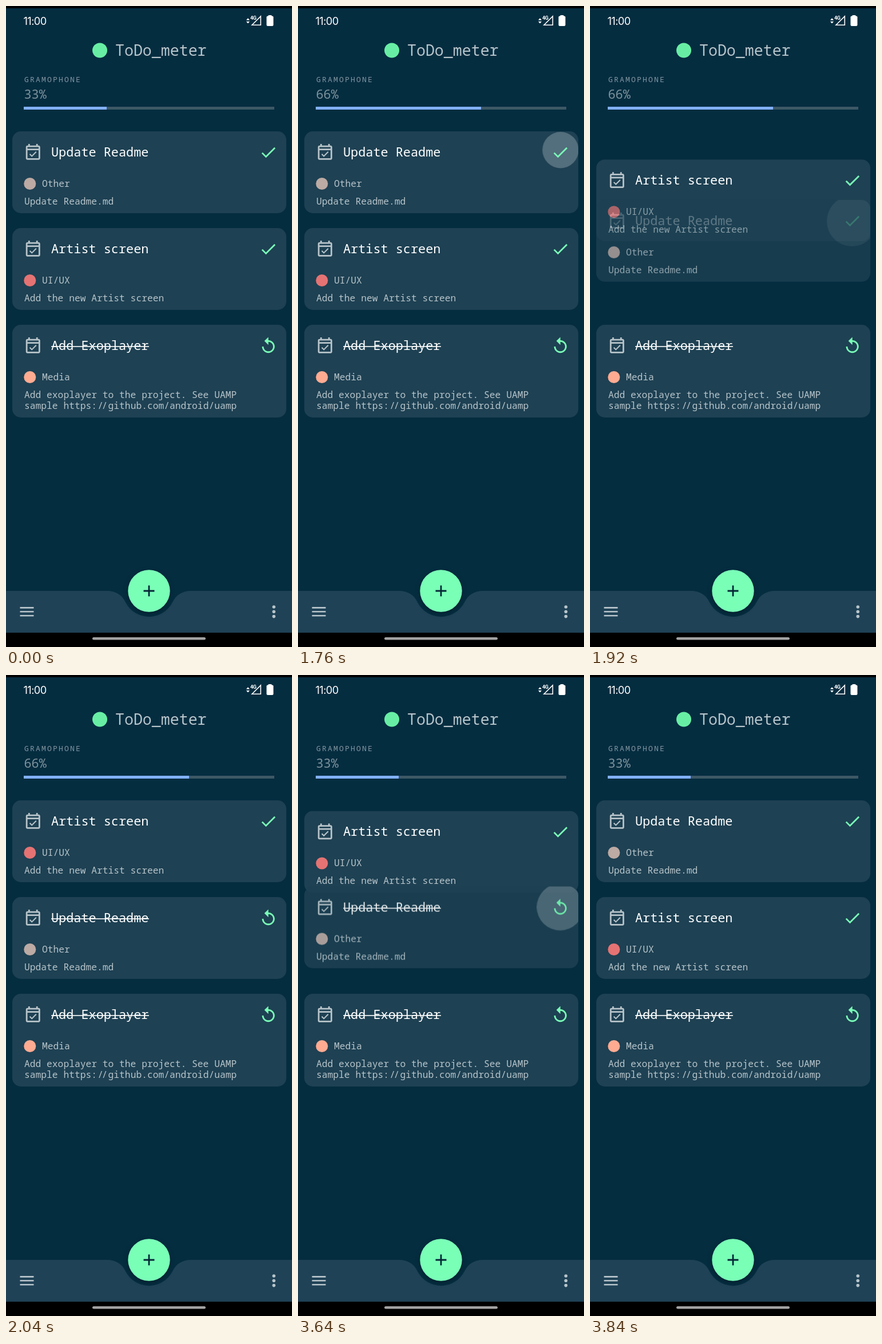
Recreate the animation shown at these times as an HTML page. Size 500x1120 px, loop 3.88 s.

```html
<!DOCTYPE html>
<html lang="en">
<head>
<meta charset="utf-8">
<title>ToDo list</title>
<style>
:root {
  --t: 0ms;
  --tap1: calc(1680ms - var(--t));
  --swap1: calc(1761ms - var(--t));
  --tap2: calc(3505ms - var(--t));
  --swap2: calc(3586ms - var(--t));
  --ease: cubic-bezier(.37, 0, .63, 1);
  --card: #1e4153;
  --green: #7affb7;
  --soft: #b7c4ca;
}
html, body { margin: 0; width: 100%; height: 100%; overflow: hidden; background: #052d40; }
svg { position: absolute; left: 0; top: 0; overflow: visible; }
text { font-family: "Noto Sans Mono", "DejaVu Sans Mono", monospace; font-size: 16.3px; fill: var(--soft); white-space: pre; }
.stage { position: absolute; left: 0; top: 0; width: 500px; height: 1120px; overflow: hidden; }

/* Every animation is paused; the clock --t moves it through its delay. */
.card, .ripple, .bar, .low, .high { animation-play-state: paused !important; }

.card {
  position: absolute; left: 11px; top: 219px; width: 478.5px; height: 142.5px;
  border-radius: 15px; overflow: hidden; background: var(--card); --dy: 169px;
}
.card .title { font-size: 21.85px; fill: #fff; }
.card .icon { fill: var(--soft); }
.card .action { fill: var(--green); }
.strike { fill: #fff; }

.open {
  z-index: 3;
  animation: move 250ms var(--ease) var(--swap1) forwards, back 250ms var(--ease) var(--swap2) forwards,
    hide 250ms var(--ease) var(--swap1) forwards, show 250ms var(--ease) var(--swap2) forwards,
    sink 1ms calc(2400ms - var(--t)) forwards;
}
.done {
  z-index: 1; opacity: 0;
  animation: move 250ms var(--ease) var(--swap1) forwards, back 250ms var(--ease) var(--swap2) forwards,
    show 250ms var(--ease) var(--swap1) forwards, hide 250ms var(--ease) var(--swap2) forwards,
    rise 1ms calc(2400ms - var(--t)) forwards;
}
.artist {
  top: 388px; z-index: 2; --dy: -169px;
  animation: move 250ms var(--ease) var(--swap1) forwards, back 250ms var(--ease) var(--swap2) forwards;
}
.media { top: 557px; height: 162px; }

.ripple {
  position: absolute; left: 403px; top: -7px; width: 88px; height: 88px;
  border-radius: 50%; background: #fff; opacity: 0;
  animation: grow 225ms cubic-bezier(.4, 0, .2, 1) var(--tap) both, glow 375ms linear var(--tap);
}
.open .ripple { --tap: var(--tap1); }
.done .ripple { --tap: var(--tap2); }

.track { position: absolute; left: 31px; top: 175.5px; width: 438px; height: 5px; background: #3d5865; }
.bar { width: 33%; height: 100%; background: #82b1ff; animation: fill 1830ms calc(1755ms - var(--t)); }
.low { animation: off 1830ms calc(1755ms - var(--t)); }
.high { opacity: 0; animation: on 1830ms calc(1755ms - var(--t)); }
.percent { font-size: 21.8px; fill: #7d929c; }

@keyframes move { to { transform: translateY(var(--dy)); } }
@keyframes back { from { transform: translateY(var(--dy)); } to { transform: translateY(0); } }
@keyframes show { from { opacity: 0; } to { opacity: 1; } }
@keyframes hide { from { opacity: 1; } to { opacity: 0; } }
@keyframes sink { to { z-index: 1; } }
@keyframes rise { to { z-index: 3; } }
@keyframes grow { from { transform: translate(2px, -9px) scale(.425); } to { transform: none; } }
@keyframes glow { 0%, 100% { opacity: 0; } 20%, 60% { opacity: .24; } }
@keyframes fill { from, to { width: 66%; } }
@keyframes on { from, to { opacity: 1; } }
@keyframes off { from, to { opacity: 0; } }
</style>
</head>
<body>
<div class="stage">
  <svg width="500" height="1120" viewBox="0 0 500 1120">
    <defs>
      <symbol id="event" viewBox="0 0 24 24">
        <path d="M19 4h-1V2h-2v2H8V2H6v2H5c-1.11 0-1.99.9-1.99 2L3 20c0 1.1.89 2 2 2h14c1.1 0 2-.9 2-2V6c0-1.1-.9-2-2-2zm0 16H5V10h14v10zm0-12H5V6h14v2z"/>
        <path d="M10.56 18.46L16.5 12.53l-1.06-1.06-4.88 4.88-2.11-2.12-1.06 1.06z"/>
      </symbol>
      <symbol id="check" viewBox="0 0 24 24">
        <path d="M9 16.17L4.83 12l-1.42 1.41L9 19 21 7l-1.41-1.41z"/>
      </symbol>
      <symbol id="undo" viewBox="0 0 24 24">
        <path d="M12 5V1L7 6l5 5V7c3.31 0 6 2.69 6 6s-2.69 6-6 6-6-2.69-6-6H4c0 4.42 3.58 8 8 8s8-3.58 8-8-3.58-8-8-8z"/>
      </symbol>
    </defs>

    <!-- status bar -->
    <rect width="500" height="4" fill="#000"/>
    <text x="30.5" y="32.5" style="font: 18.3px Inter, sans-serif; letter-spacing: -.6px; fill: #fff">11:00</text>
    <g fill="#fff">
      <path d="M420 24.8l3-3.6 3 3.6zM420 27l3 3.6 3-3.6z"/>
      <text x="427" y="24" style="font: bold 9px Roboto, sans-serif; letter-spacing: -.4px; fill: #fff">4G</text>
      <path d="M430 33.2L445.3 18V33.2z" fill="none" stroke="#fff" stroke-width="1.6"/>
      <rect x="455.5" y="17.5" width="12" height="17.5" rx="2"/>
      <rect x="458.5" y="16" width="6" height="3" rx="1"/>
    </g>

    <!-- header -->
    <circle cx="164" cy="77.5" r="13" fill="#68eea4"/>
    <text x="191" y="86.5" style="font-size: 26.6px">ToDo_meter</text>
    <text x="32" y="132.5" style="font-size: 13px; letter-spacing: 2.2px; fill: #8095a0">GRAMOPHONE</text>
    <text class="percent low" x="31.5" y="162">33%</text>
    <text class="percent high" x="31.5" y="162">66%</text>

    <!-- bottom bar -->
    <path fill="#1f4256" d="M0 1022H176C192 1022 203 1029 209 1042A46 46 0 0 0 291 1042C297 1029 308 1022 324 1022H500V1095H0Z"/>
    <circle cx="250" cy="1022" r="36.7" fill="#7affb7" style="filter: drop-shadow(0 3px 4px rgba(0, 0, 0, .3))"/>
    <path d="M240.5 1022h19M250 1012.5v19" stroke="#062636" stroke-width="2.8"/>
    <path d="M24.5 1051.4h24M24.5 1058.3h24M24.5 1065.2h24" stroke="#b7c4ca" stroke-width="2.6"/>
    <g fill="#b7c4ca">
      <circle cx="468.3" cy="1050" r="2.8"/>
      <circle cx="468.3" cy="1058.3" r="2.8"/>
      <circle cx="468.3" cy="1066.6" r="2.8"/>
    </g>
    <rect y="1095" width="500" height="25" fill="#000"/>
    <rect x="151" y="1103" width="198" height="4.6" rx="2.3" fill="#a3a3a3"/>
  </svg>

  <div class="track"><div class="bar"></div></div>

  <div class="card open">
    <div class="ripple"></div>
    <svg width="478" height="142">
      <use class="icon" href="#event" x="19.6" y="19.2" width="33.3" height="33.3"/>
      <text class="title" x="68" y="44">Update Readme</text>
      <use class="action" href="#check" x="431" y="20" width="33.3" height="33.3"/>
      <circle cx="30.8" cy="91.5" r="10.5" fill="#bcaaa4"/>
      <text x="52" y="97">Other</text>
      <text x="21" y="127.7">Update Readme.md</text>
    </svg>
  </div>

  <div class="card done">
    <div class="ripple"></div>
    <svg width="478" height="142">
      <use class="icon" href="#event" x="19.6" y="19.2" width="33.3" height="33.3"/>
      <text class="title" x="68" y="44">Update Readme</text>
      <rect class="strike" x="68" y="37.2" width="171" height="1.6"/>
      <use class="action" href="#undo" x="431" y="20" width="33.3" height="33.3"/>
      <circle cx="30.8" cy="91.5" r="10.5" fill="#bcaaa4"/>
      <text x="52" y="97">Other</text>
      <text x="21" y="127.7">Update Readme.md</text>
    </svg>
  </div>

  <div class="card artist">
    <svg width="478" height="142">
      <use class="icon" href="#event" x="19.6" y="19.2" width="33.3" height="33.3"/>
      <text class="title" x="68" y="44">Artist screen</text>
      <use class="action" href="#check" x="431" y="20" width="33.3" height="33.3"/>
      <circle cx="30.8" cy="91.5" r="10.5" fill="#e57373"/>
      <text x="52" y="97">UI/UX</text>
      <text x="21" y="127.7">Add the new Artist screen</text>
    </svg>
  </div>

  <div class="card media">
    <svg width="478" height="162">
      <use class="icon" href="#event" x="19.6" y="19.2" width="33.3" height="33.3"/>
      <text class="title" x="68" y="44">Add Exoplayer</text>
      <rect class="strike" x="68" y="37.2" width="171" height="1.6"/>
      <use class="action" href="#undo" x="431" y="20" width="33.3" height="33.3"/>
      <circle cx="30.8" cy="91.5" r="10.5" fill="#ffab91"/>
      <text x="52" y="97">Media</text>
      <text x="21" y="127.7">Add exoplayer to the project. See UAMP</text>
      <text x="21" y="147.3">sample https:<tspan dx="1.3">/</tspan><tspan dx="-2.6">/</tspan><tspan dx="1.3">github.com/android/uamp</tspan></text>
    </svg>
  </div>
</div>

<script>
const LOOP = 3880, STEP = 40;
const LEAD = 10; // a tick just short of a step counts as that step
const start = performance.now();

function tick() {
  const t = (performance.now() - start + LEAD) % LOOP;
  document.documentElement.style.setProperty('--t', Math.floor(t / STEP) * STEP + 'ms');
  requestAnimationFrame(tick);
}
tick();
</script>
</body>
</html>
```
